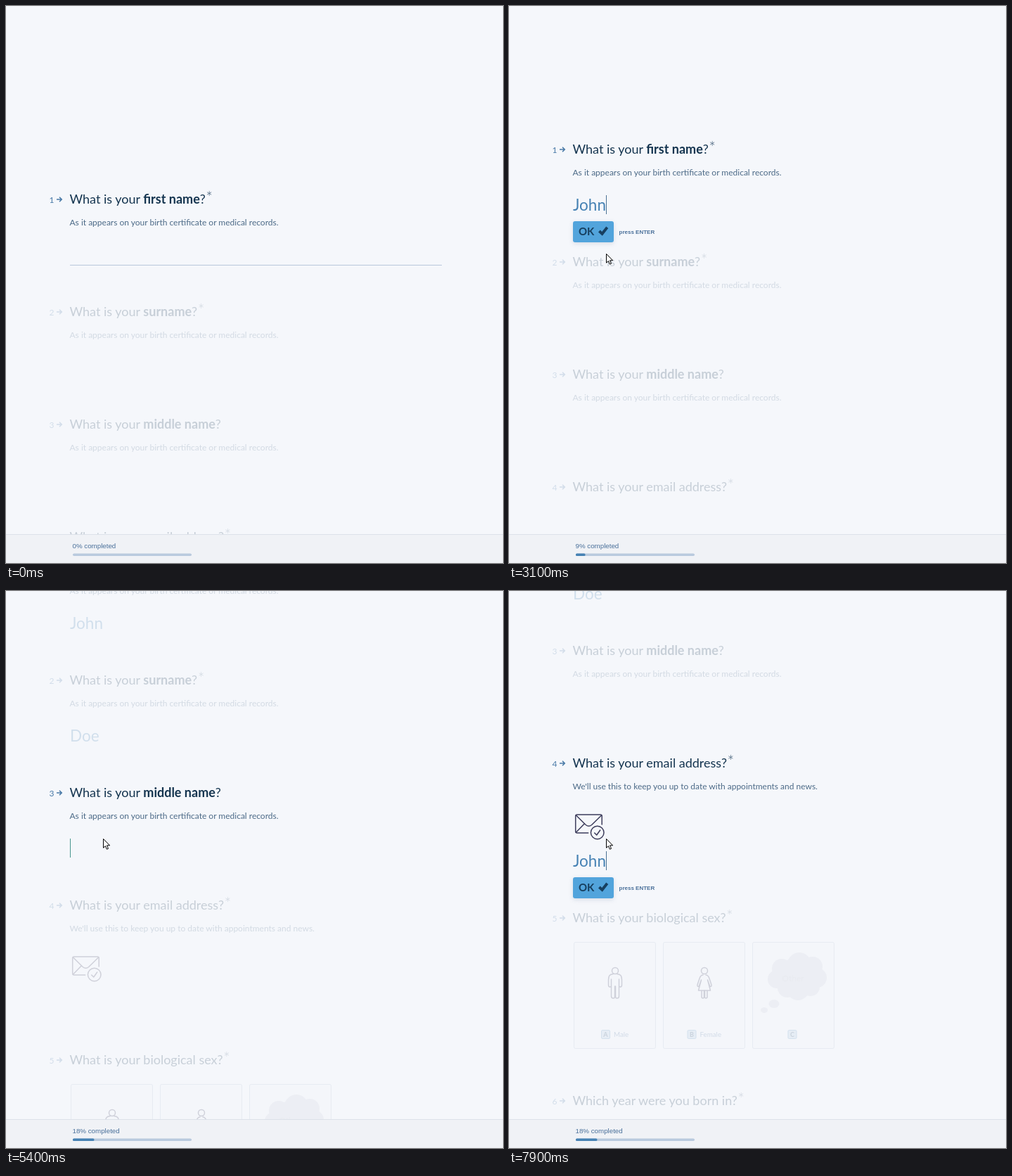
Animation, 707 px wide and 792 px high, one loop 8 s. Source, as an HTML page:

```html
<!DOCTYPE html>
<html lang="en">
<head>
<meta charset="utf-8">
<title>Form walkthrough</title>
<style>
  html, body { margin: 0; width: 100%; height: 100%; overflow: hidden; background: #f5f7fb; }
  svg { display: block; width: 707px; height: 792px; font-family: Lato, sans-serif; }
  .q { opacity: .2; }
  .q.on { opacity: 1; }
  .title { font-size: 18px; fill: #14344f; }
  .title .b { font-weight: 700; }
  .title .star { font-size: 23px; font-weight: 300; fill: #3d5a75; }
  .sub { font-size: 12px; fill: #4c6a87; }
  .num { font-size: 12px; fill: #4a7aa8; }
  .arrow { fill: none; stroke: #4a7aa8; stroke-width: 1.6; }
  .answer { font-size: 22.5px; fill: #4682b4; }
  .icon { fill: none; stroke: #3d3d5c; stroke-width: 1.5; stroke-linecap: round; stroke-linejoin: round; }
  .card { fill: #6f88a8; fill-opacity: .05; stroke: #6f88a8; stroke-opacity: .5; }
  .key { fill: #4682b4; fill-opacity: .4; stroke: #4682b4; stroke-opacity: .9; }
  .letter { font-size: 9px; font-weight: 700; fill: #24486a; text-anchor: middle; }
  .choice { font-size: 9.75px; fill: #4a6f99; }
  .cloud { fill: #3d3d5c; opacity: .2; }
  .ok { filter: drop-shadow(0 2px 3px rgba(20, 50, 90, .13)); }
  .small { font-family: "Liberation Sans", Arial, sans-serif; fill: #4a709a; }
</style>
</head>
<body>
<svg viewBox="0 0 707 792">
  <defs>
    <path id="man" d="M2.5 79.5C8 80 9.5 82 9.5 88V95Q9.5 98 7.5 98Q5.5 98 5.5 96V87M5.5 96V111Q5.5 114 3 114H2Q.5 114 .5 111V97"/>
    <path id="woman" d="M2 81C5 81 6 83 7 86L10 95Q10.3 98 8 97.5L4.5 88L8.5 103H0M4 103V112Q4 114 2 114Q.5 114 .5 112V104"/>
  </defs>
  <rect width="707" height="792" fill="#f5f7fb"/>
  <g id="page"></g>
  <rect id="line" x="91" y="368" width="529" height="1" fill="#b9c8dc"/>
  <g id="entry">
    <rect id="caret" y="65" width="1" height="27"/>
    <g id="button">
      <rect class="ok" x="91" y="102" width="58" height="30" rx="3" fill="#52a4dc"/>
      <text x="99" y="121.5" font-size="15" font-weight="700" fill="#173f5f">OK</text>
      <path d="M127 117.5L129.8 114.6L132.2 117L138.2 109.6L141.2 111.9L132.8 122.8Z" fill="#173f5f"/>
      <text class="small" x="156.5" y="119.5" font-size="8" font-weight="700">press ENTER</text>
    </g>
  </g>
  <rect y="751" width="707" height="41" fill="#f0f2f6"/>
  <rect y="751" width="707" height="1" fill="#dce1e9"/>
  <text id="label" class="small" x="94.5" y="771" font-size="9.75"></text>
  <rect x="95" y="778.5" width="169" height="3.5" rx="1.75" fill="#b9cade"/>
  <rect id="fill" x="95" y="778.5" height="3.5" rx="1.5" fill="#4682b4"/>
  <rect id="beam" x="145" y="352" width="1" height="16" fill="#f1f3f7"/>
  <path id="mouse" d="M.5 .5V13.2L3.4 10.6L5.4 15.2L7.5 14.3L5.5 9.8H9.6Z" fill="#fff" stroke="#000"/>
</svg>
<script>
const $ = id => document.getElementById(id);
const show = (el, on) => el.setAttribute('visibility', on ? 'visible' : 'hidden');
const move = (el, x, y) => el.setAttribute('transform', `translate(${x} ${y})`);

const birth = 'As it appears on your birth certificate or medical records.';
const bold = s => `<tspan class="b">${s}</tspan>`;

const envelope = `<g class="icon" transform="translate(-.3 0)">
  <path d="M132.5 87V75Q132.5 73 130.5 73H97Q95 73 95 75V97Q95 99 97 99H113"/>
  <path d="M95.8 74L109.5 87.5Q113.8 91 118 87.5L131.8 74M95.8 98L107 86.5"/>
  <circle cx="126" cy="98.5" r="9.3"/>
  <path d="M122 99L125 102L130 95"/></g>`;

const person = (x, id) => `<g class="icon" transform="translate(${x} 0)">
  <circle cy="75" r="4.5"/><use href="#${id}"/><use href="#${id}" transform="scale(-1 1)"/></g>`;
const card = (x, keyX, letter, name) => `<rect class="card" x="${x}" y="34.5" width="116" height="151" rx="2"/>
  <rect class="key" x="${keyX}" y="159.5" width="12" height="12" rx="1.5"/>
  <text class="letter" x="${keyX + 6}" y="169">${letter}</text>
  <text class="choice" x="${keyX + 17.5}" y="169">${name}</text>`;

const puffs = [[410, 84, 28], [413, 66, 17], [388, 72, 14], [381, 87, 13], [432, 69, 14],
  [438, 85, 14], [396, 99, 14], [411, 101, 16], [429, 98, 13]];
const cards = card(92.5, 131.5, 'A', 'Male') + card(219.5, 254, 'B', 'Female') + card(346.5, 397, 'C', '') +
  person(151, 'man') + person(278, 'woman') +
  `<g class="cloud">${puffs.map(([x, y, r]) => `<circle cx="${x}" cy="${y}" r="${r}"/>`).join('')}
  <ellipse cx="377" cy="122" rx="7.5" ry="6"/><ellipse cx="363" cy="131" rx="5" ry="4"/></g>
  <text x="404" y="90" font-size="12" text-anchor="middle" fill="#3d3d5c" opacity=".15">Other</text>`;

// y is the middle of the title line; keys are the times at which each letter is typed
const questions = [
  { y: 275, title: `What is your ${bold('first name')}?`, star: true, sub: birth,
    word: 'John', keys: [1500, 1700, 1900, 2000] },
  { y: 435, title: `What is your ${bold('surname')}?`, star: true, sub: birth,
    word: 'Doe', keys: [4000, 4300, 4500] },
  { y: 595, title: `What is your ${bold('middle name')}?`, sub: birth },
  { y: 755, title: 'What is your email address?', star: true, extra: envelope, drop: 60,
    sub: "We'll use this to keep you up to date with appointments and news.",
    word: 'John', keys: [7200, 7400, 7600, 7900] },
  { y: 975, title: 'What is your biological sex?', star: true, extra: cards },
  { y: 1235, title: 'Which year were you born in?', star: true },
];

$('page').innerHTML = questions.map((q, i) => `<g class="q" transform="translate(0 ${q.y})">
  <text class="num" x="61.5" y="4.5">${i + 1}</text>
  <path class="arrow" d="M72 0H79M76 -3.2L79.2 0L76 3.2"/>
  <text class="title" x="90.5" y="6">${q.title}${q.star ? '<tspan class="star" dx=".5">*</tspan>' : ''}</text>
  <g class="more"><text class="sub" x="90.5" y="37">${q.sub || ''}</text>${q.extra || ''}</g>
  <text class="answer" x="91" y="${87 + (q.drop || 0)}"></text></g>`).join('');

const groups = [...document.querySelectorAll('.q')];
const answers = groups.map(g => g.querySelector('.answer'));
const details = groups.map(g => g.querySelector('.more'));

const scrolls = [
  { from: 3000, start: 2924, len: 380, dist: 160 },
  { from: 5200, start: 5100, len: 365, dist: 160 },
  { from: 6400, start: 6175, len: 380, dist: 190 },
];
const caretOn = [[600, 1100], [1500, 2600], [3100, 3700], [4000, 5000], [5300, 5900], [6400, 7000], [7200, 8000]];
const mouseOn = [[100, 400], [3000, 3400], [5200, 5600], [6400, 8000]];
const path = [[334, 676], [222, 470], [161, 376]];

const within = (spans, t) => spans.some(([a, b]) => t >= a && t < b);
const clamp = p => Math.max(0, Math.min(1, p));
const swing = p => .5 - Math.cos(Math.PI * p) / 2;
const easeOut = p => 1 - (1 - p) ** 2;

function draw(t) {
  let offset = 0, active = 0;
  for (const s of scrolls) {
    const p = t < s.from ? 0 : clamp((t - s.start) / s.len);
    offset += Math.round(s.dist * swing(p));
    if (p >= .5) active++;
  }
  move($('page'), 0, -offset);

  questions.forEach((q, i) => {
    groups[i].classList.toggle('on', i === active);
    show(details[i], i <= active + 2); // far questions load their title only
    if (q.word) answers[i].textContent = q.word.slice(0, q.keys.filter(k => t >= k).length);
  });

  const q = questions[active], typed = answers[active].textContent;
  move($('entry'), 0, q.y - offset + (q.drop || 0));
  const width = typed ? answers[active].getComputedTextLength() : 0;
  $('caret').setAttribute('x', Math.round(91 + width));
  $('caret').setAttribute('fill', typed ? '#4a7294' : '#4a9690');
  show($('caret'), within(caretOn, t));
  $('button').setAttribute('opacity', typed ? clamp((t - q.keys[0] + 100) / 300) : 0);
  show($('line'), t < 1100);

  $('label').textContent = (t < 3000 ? 0 : t < 5200 ? 9 : 18) + '% completed';
  const done = easeOut(clamp((t - 2900) / 300)) + easeOut(clamp((t - 5100) / 300));
  $('fill').setAttribute('width', 169 * .09 * done);

  const arrow = within(mouseOn, t);
  const [x, y] = t < 400 ? path[Math.max(0, t / 100 - 1)] : [138, 352];
  move($('mouse'), x, y);
  show($('mouse'), arrow);
  show($('beam'), !arrow && t >= 400);
}

// the picture changes ten times a second
function tick() {
  draw(Math.floor(performance.now() % 8000 / 100) * 100);
  requestAnimationFrame(tick);
}
tick();
</script>
</body>
</html>
```
